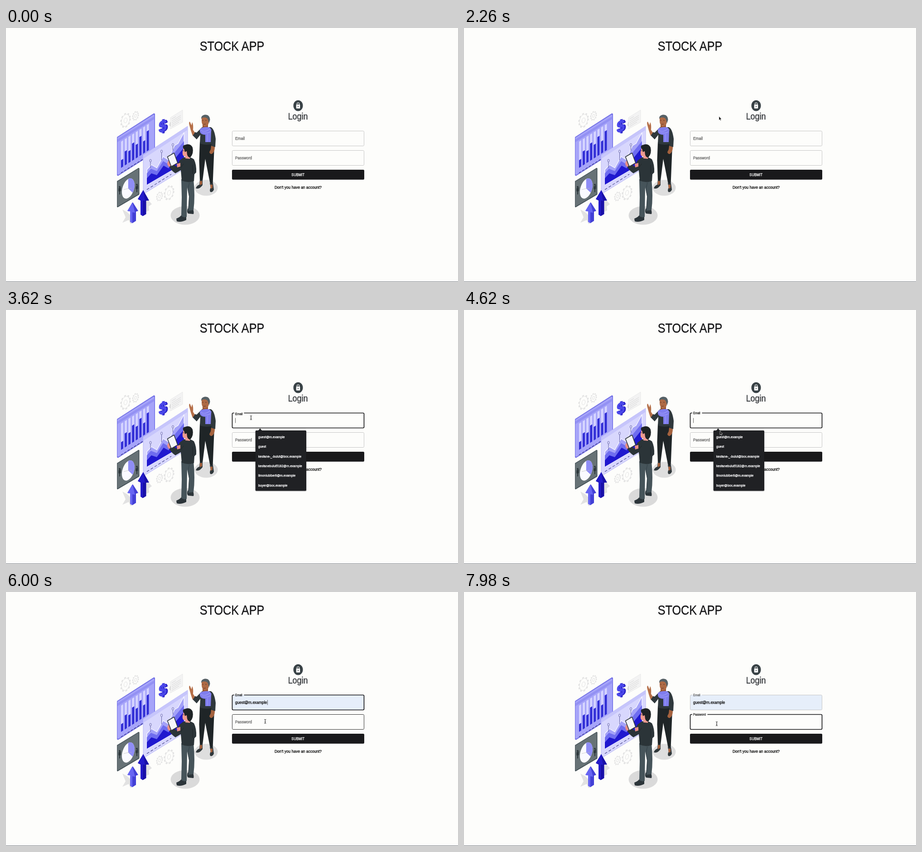
Recreate the animation shown at these times as an HTML page. Size 998 by 561 pixels, loop 8000 ms.

```html
<!DOCTYPE html>
<html lang="en">
<head>
<meta charset="utf-8">
<title>Stock app login</title>
<style>
html, body { margin: 0; width: 100%; height: 100%; overflow: hidden; background: #fdfdfb; }
svg { display: block; width: 100%; height: 100%; }
text { font-family: "Liberation Sans", Arial, sans-serif; white-space: pre; }
</style>
</head>
<body>
<svg id="stage" viewBox="0 0 998 561" preserveAspectRatio="none">
  <rect width="998" height="561" fill="#fdfdfb"/>
  <rect y="560" width="998" height="1" fill="#70747c"/>

  <g id="gears" fill="none" stroke="#e2e2e2"></g>

  <g id="note">
    <path d="M363 198L390 181V208L363 223Z" fill="#f3f3f3" stroke="#e2e2e2" stroke-width=".7"/>
    <path d="M361 214L363 208V217ZM366 201L375 195.5M366 205.5L386 193M366 209.5L386 197M366 213.5L386 201M366 217.5L382 207.5" fill="#e2e2e2" stroke="#cfcfcf" stroke-width=".8"/>
  </g>

  <g id="dollar" font-weight="700" text-anchor="middle">
    <text transform="translate(348.5 229) skewY(-22) scale(.85 1)" font-size="36" fill="#2a22c4" stroke="#2a22c4" stroke-width="2">$</text>
    <text transform="translate(345.8 229) skewY(-22) scale(.85 1)" font-size="36" fill="#4b48ea" stroke="#4b48ea" stroke-width="1.6">$</text>
  </g>

  <g id="barPanel" stroke-linejoin="round">
    <path d="M247 242L327 190.5V274L247 324.5Z" fill="#7371e6" stroke="#7371e6" stroke-width="4"/>
    <path d="M247.5 243L326 193V273L247.5 322.5Z" fill="#a6a4f9" stroke="#a6a4f9" stroke-width="3"/>
    <path d="M246 246L327.5 195V201L246 252Z" fill="#9391f3"/>
    <path d="M254 320L322 277.5" stroke="#33327c" stroke-width="1.1" stroke-dasharray="5 3.5"/>
  </g>

  <g id="areaPanel" stroke-linejoin="round">
    <path d="M303 281L401 217V307L303 367Z" fill="#d8d7fd" stroke="#b9b8f6"/>
    <path d="M303 281L401 217V225L303 289Z" fill="#c6c5fb"/>
    <path d="M311 313L321 302L333 309L347 284L358 291L372 260L380 255L393 231V298L311 346Z" fill="#a3a1f8" stroke="#f8f8ff" stroke-width="1.4"/>
    <path d="M311 321L320 311L333 316L347 294L359 301L374 273L393 250V298L311 346Z" fill="#6f6def"/>
    <path d="M311 332L321 321L333 325L348 304L359 310L376 285L393 264V298L311 346Z" fill="#2018cf"/>
    <path d="M319 296V309M343.5 275V292M368.5 261V271" stroke="#55549a" stroke-width=".9"/>
    <path d="M311 357L365 323" stroke="#3b3a86" stroke-width="1.1" stroke-dasharray="6 4"/>
    <g fill="#dddcff" stroke="#55549a" stroke-width=".8">
      <ellipse cx="319" cy="293" rx="2" ry="3"/><ellipse cx="343.5" cy="272.5" rx="2" ry="3"/><ellipse cx="368.5" cy="258" rx="2" ry="3"/>
    </g>
  </g>

  <g id="piePanel" stroke-linejoin="round">
    <path d="M246.5 339L293 310.5V367L246.5 394.5Z" fill="#465359" stroke="#465359" stroke-width="3"/>
    <path d="M246.5 340L292 312V366L246.5 393Z" fill="#677276" stroke="#677276" stroke-width="1.5"/>
    <g transform="translate(269.8 354.5) skewY(-29)">
      <ellipse rx="14" ry="21" fill="#fafaff"/>
      <path d="M0 0V-21A14 21 0 0 1 10 14.7Z" fill="#8f8df6"/>
      <path d="M-10 -3L0 0L8 4" fill="none" stroke="#bbb" stroke-width=".6"/>
    </g>
    <g fill="#2c363a">
      <circle cx="251" cy="351" r="2"/><path d="M248.5 354L253.5 352V360L252 361V367L250 368V361L248.5 361Z"/>
      <circle cx="289" cy="346" r="2"/><path d="M286.5 350L291.5 347V355L290 356V362L288 363V356L286.5 356Z"/>
    </g>
  </g>

  <g id="arrows">
    <path d="M257 401L268 407L281 420L284 428L275 433L271 424L257 430L264 418ZM307 386L314 380L322 389L315 394L316 403L307 407Z" fill="#e2e2e2"/>
    <path d="M303 358L316 381L309.5 381.5V411L302 415.5L297 412V381L291 378Z" fill="#1910a8"/>
    <path d="M303 358L291 378L297 379V412L302 415V381L307 382Z" fill="#231aca"/>
    <path d="M280 385L292 404L287 405.5V426L279 431L274 428V405L268 404Z" fill="#4340d6"/>
    <path d="M279 385L268 404L274 405V428L279 431V407L285 408Z" fill="#6765f2"/>
  </g>

  <g id="woman">
    <ellipse cx="442" cy="353" rx="25.5" ry="17.5" fill="#dedede"/>
    <path d="M428 252L426.5 292L428 337H434L440 289L451 345H456.5L460 260L456 250Z" fill="#1f2527"/>
    <path d="M428 335L434 336L434 347Q427 357 419 354Q421 348 427 346ZM450 343H457L459 357Q456 364 451 362Q449 358 452 352Z" fill="#30383b"/>
    <path d="M428 338L433 338L433 345L428 347ZM451 346L456 346L456 353L452 355Z" fill="#a5623e"/>
    <path d="M421 231L433 219L452 219Q460 222 463 245L462 263L453 261L455 246L455 256Q441 260 428 255L429 236L421 246L412 237L417 230Z" fill="#2f383c"/>
    <path d="M412 238L417 231L413 225Q414 213 411 208L409.5 215L406 207Q403 207 405 215L408 226Z" fill="#b56f48"/>
    <path d="M453 260L461 263Q461 273 455 278Q450 279 449 274L452 268Z" fill="#a5623e"/>
    <path d="M434 210H446V222Q440 227 434 221Z" fill="#965534"/>
    <path d="M432 199Q440 193 448 200L447 212Q443 219 437 217Q432 213 432 205Z" fill="#ae6a45"/>
    <path d="M431 201Q430 193 439 191.5Q450 191 450.5 203L448 211L446.5 204Q445 197 438 197.5Q433 197 431 201Z" fill="#566166"/>
    <path d="M433.5 204H436M440 204H443M436 212Q438 213.5 441 212" fill="none" stroke="#4a2a20" stroke-width=".8"/>
    <path d="M428 223Q435 218 448 219Q455 223 453 229L452 252H440V236Q430 236 428 229Z" fill="#807eee"/>
    <path d="M430 226Q440 232 451 222M433 231Q444 234 451 229M445 234V251" fill="none" stroke="#a09ef7" stroke-width="1.1"/>
  </g>

  <g id="man">
    <ellipse cx="395.5" cy="414" rx="32" ry="20.5" fill="#dadada"/>
    <path d="M376 421Q386 417 388 412L398 415V424Q386 430 377 427ZM401 399L411 396Q416 405 414 411L403 410Q398 408 401 399Z" fill="#2c353a"/>
    <path d="M387 334L414 334Q418 372 414 402L402 404L404 372L400 352L399 417Q393 420 387 415L388 374Z" fill="#46545a"/>
    <path d="M405 341L402 355L405 373L403 403" fill="none" stroke="#37434a" stroke-width="1.2"/>
    <path d="M392 286Q405 283 415 290Q421 302 420 319L416 323L415 338Q401 343 388 337L386 314L374 321Q366 316 360 306L367 300L377 306L383 293Z" fill="#2b3438"/>
    <path d="M386 309L392 300M412 302L412 322" fill="none" stroke="#1e2527"/>
    <path d="M360 307L368 301L363 292L358 294Q355 299 357 303Z" fill="#e98f85"/>
    <path d="M356.5 284.5L371 276L379 298L365 306Z" fill="#f5f5fa" stroke="#30383d" stroke-width="1.6" stroke-linejoin="round"/>
    <path d="M377 300L385 298L385 306L378 308Z" fill="#e98f85"/>
    <path d="M392 265Q389 273 390 279Q391 284 396 283V288L406 289L407 277Z" fill="#ef9b90"/>
    <path d="M391 265Q389 259 396 258Q407 254 412 264Q415 277 407 286Q402 286 400 280L399 272L395 274Q394 267 391 265Z" fill="#1e2325"/>
    <path d="M390 271H394" stroke="#2c3033" stroke-width=".8"/>
  </g>

  <g id="lock">
    <ellipse cx="645" cy="171.5" rx="10.5" ry="12" fill="#394246"/>
    <path d="M642.5 169.5V167.5Q642.5 165 645 165Q647.5 165 647.5 167.5V169.5" fill="none" stroke="#fff" stroke-width="1.2"/>
    <rect x="640.8" y="169" width="8.4" height="8.8" rx="1" fill="#fff"/>
    <circle cx="645" cy="173.4" r="1.1" fill="#394246"/>
  </g>

  <g id="form"></g>
  <g id="menu"></g>
  <g id="pointer">
    <path id="arrow" d="M0 0V8.6L1.9 6.9L3.2 9.8L4.5 9.2L3.2 6.4H5.7Z" fill="#0b0b0b" stroke="#fff" stroke-width=".6"/>
    <path id="beam" d="M-2 -4.5Q0 -4.5 0 -3V3Q0 4.5 -2 4.5M2 -4.5Q0 -4.5 0 -3M0 3Q0 4.5 2 4.5M-1 1H1" fill="none" stroke="#222"/>
  </g>
</svg>

<script>
const $ = id => document.getElementById(id);
const form = $('form'), menu = $('menu');
const ACCOUNTS = ['guest@m.example', 'guest', 'kestane-_-bulut@box.example',
  'kestanebulut5182@m.example', 'limonlubiberli@m.example', 'buyer@box.example'];
const LOOP = 8000, FOCUS_EMAIL = 3510, MENU_OPEN = 3580, HOVER_ITEM = 4880,
  PICK = 5700, FOCUS_PASSWORD = 6530;

// The page is shown at 0.526 by 0.6 of its layout size.
const SX = .526, SY = .6;

function add(parent, tag, attrs, content = '') {
  const el = document.createElementNS('http://www.w3.org/2000/svg', tag);
  set(el, attrs);
  el.textContent = content;
  parent.append(el);
  return el;
}
function set(el, attrs) {
  for (const key in attrs) el.setAttribute(key, attrs[key]);
}
const show = (el, on) => set(el, { visibility: on ? 'visible' : 'hidden' });
const place = (x, y, k = 1) => `translate(${x} ${y}) scale(${SX * k} ${SY * k})`;

// A fine outline gives the text its slightly heavy rendering.
function label(parent, content, x, y, size, fill, anchor = 'start', spacing = 0) {
  return add(parent, 'text', { transform: place(x, y), 'font-size': size, fill, stroke: fill,
    'stroke-width': .6, 'text-anchor': anchor, 'letter-spacing': spacing }, content);
}

// Illustration parts that follow a rule
for (const [x, y, rx, ry] of [[264, 204, 9, 13], [286, 194, 5.5, 8], [360, 364, 9, 13], [339, 372, 5.5, 8]]) {
  const gear = add($('gears'), 'g', { transform: `translate(${x} ${y}) skewY(-20)` });
  add(gear, 'ellipse', { rx, ry, 'stroke-width': 1 });
  add(gear, 'ellipse', { rx: rx * 1.15, ry: ry * 1.15, 'stroke-width': 2.5, 'stroke-dasharray': `${rx * .45} ${rx * .45}` });
  add(gear, 'ellipse', { rx: rx * .4, ry: ry * .4, 'stroke-width': 1 });
}
[17, 31, 26, 38, 30, 42, 27, 44].forEach((height, i) => {
  const x = 254 + i * 8.1, base = 309 - i * 5.2;
  const column = (h, fill) => add($('barPanel'), 'path', { fill, d: `M${x} ${base}v${-h}l4.8 -3v${h}z` });
  column(58, '#d6d5ff');
  column(height, '#2f2cd6');
});

// Static page text
label(form, 'STOCK APP', 499, 49.7, 48, '#161618', 'middle');
label(form, 'Login', 644.5, 202.2, 34, '#33363a', 'middle');

const LEFT = 499.5, RIGHT = 790.5, FIELD_HEIGHT = 33;
function makeField(name, y, notchEnd) {
  const fill = add(form, 'rect', { x: LEFT, y, width: RIGHT - LEFT, height: FIELD_HEIGHT, rx: 2.2 });
  const border = add(form, 'path', { fill: 'none' });
  const caption = label(form, name, 506, y + 19.2, 16);
  const caret = add(form, 'rect', { y: y + 11, width: .8, height: 11, fill: '#333' });
  return { y, notchEnd, fill, border, caption, caret };
}
const email = makeField('Email', 227.5, 525.5);
const password = makeField('Password', 270.5, 537.5);
const value = label(form, ACCOUNTS[0], 506, 247, 16, '#111');

add(form, 'rect', { x: 499, y: 314.2, width: 292, height: 21.5, rx: 2.2, fill: '#000', opacity: .18 });
add(form, 'rect', { x: 499, y: 313, width: 292, height: 21.8, rx: 2.2, fill: '#19191b' });
label(form, 'SUBMIT', 644.8, 327, 14, '#fff', 'middle', .4);
label(form, "Don't you have an account?", 645, 355, 16, '#111', 'middle');

// Suggestion list
add(menu, 'rect', { x: 550, y: 267, width: 114, height: 134, rx: 3, fill: '#000', opacity: .12 });
add(menu, 'path', { d: 'M556 267L561 261.5L566 267Z', fill: '#202124' });
add(menu, 'rect', { x: 550.7, y: 266, width: 112.3, height: 133.5, rx: 2, fill: '#202124' });
const highlight = add(menu, 'rect', { x: 550.7, y: 269.3, width: 112.3, height: 21.2, fill: '#36373a' });
ACCOUNTS.forEach((name, i) => label(menu, name, 557, 282.7 + i * 21.4, 13.33, '#f6f6f7'));

// Pointer path: time, x, y
const PATH = [[0, 716, -20], [880, 716, -20], [1560, 678, 60], [2200, 563, 195], [2800, 563, 195],
  [3430, 541, 238], [4150, 541, 238], [4600, 565, 267], [5000, 580, 280.5], [5450, 581, 281],
  [5750, 581, 282], [6350, 558, 292], [6650, 558, 292], [7300, 558, 291], [LOOP, 558, 291]];

const clamp = v => Math.min(1, Math.max(0, v));
const easeOut = v => 1 - (1 - clamp(v)) ** 2.4;

function pointerAt(t) {
  const i = PATH.findIndex(p => p[0] > t);
  const a = PATH[i - 1], b = PATH[i], v = (t - a[0]) / (b[0] - a[0]);
  const k = v * v * (3 - 2 * v);
  return [a[1] + (b[1] - a[1]) * k, a[2] + (b[2] - a[2]) * k];
}

function drawField(f, t, { start, focused, hovered, filled, caretX, blinkStart }) {
  const rise = easeOut((t - start) / 200);
  const notch = easeOut((t - start - 50) / 60);
  const top = f.y, bottom = f.y + FIELD_HEIGHT, r = 2.2;
  const gapStart = 504, gapEnd = gapStart + (f.notchEnd - gapStart) * notch;
  const ink = focused ? '#222' : '#666';
  set(f.border, {
    d: `M${gapEnd} ${top}H${RIGHT - r}Q${RIGHT} ${top} ${RIGHT} ${top + r}V${bottom - r}` +
      `Q${RIGHT} ${bottom} ${RIGHT - r} ${bottom}H${LEFT + r}Q${LEFT} ${bottom} ${LEFT} ${bottom - r}` +
      `V${top + r}Q${LEFT} ${top} ${LEFT + r} ${top}H${gapStart}`,
    stroke: focused ? '#161618' : hovered ? '#333' : '#c6c6c6',
    'stroke-width': focused ? 1.7 : 1
  });
  set(f.fill, { fill: filled ? '#e6eefa' : '#fdfdfb' });
  set(f.caption, { transform: place(506, top + 19.2 - 17 * rise, 1 - .25 * rise), fill: ink, stroke: ink });
  set(f.caret, { x: caretX });
  show(f.caret, focused && blinkStart !== null && Math.floor((t - blinkStart) / 500) % 2 === 0);
}

function draw(t) {
  const [x, y] = pointerAt(t);
  const open = t >= MENU_OPEN && t < PICK;
  const inside = f => x > LEFT && x < RIGHT && y > f.y && y < f.y + FIELD_HEIGHT;
  const preview = t >= HOVER_ITEM && t < PICK;
  const filled = t >= HOVER_ITEM;

  drawField(email, t, {
    start: FOCUS_EMAIL, focused: t >= FOCUS_EMAIL && t < FOCUS_PASSWORD, hovered: inside(email), filled,
    caretX: filled ? 577 : 506.3, blinkStart: preview ? null : filled ? PICK : FOCUS_EMAIL
  });
  drawField(password, t, {
    start: FOCUS_PASSWORD, focused: t >= FOCUS_PASSWORD, hovered: !open && inside(password), filled: false,
    caretX: 506.3, blinkStart: FOCUS_PASSWORD - 60
  });
  show(value, filled);
  set(value, { 'font-size': preview ? 13.33 : 16 });
  show(menu, open);
  show(highlight, preview);

  const typing = inside(email) || (!open && inside(password));
  set($('pointer'), { transform: `translate(${x} ${y})` });
  show($('arrow'), !typing);
  show($('beam'), typing);
}

function tick() {
  draw(performance.now() % LOOP);
  requestAnimationFrame(tick);
}
tick();
</script>
</body>
</html>
```
